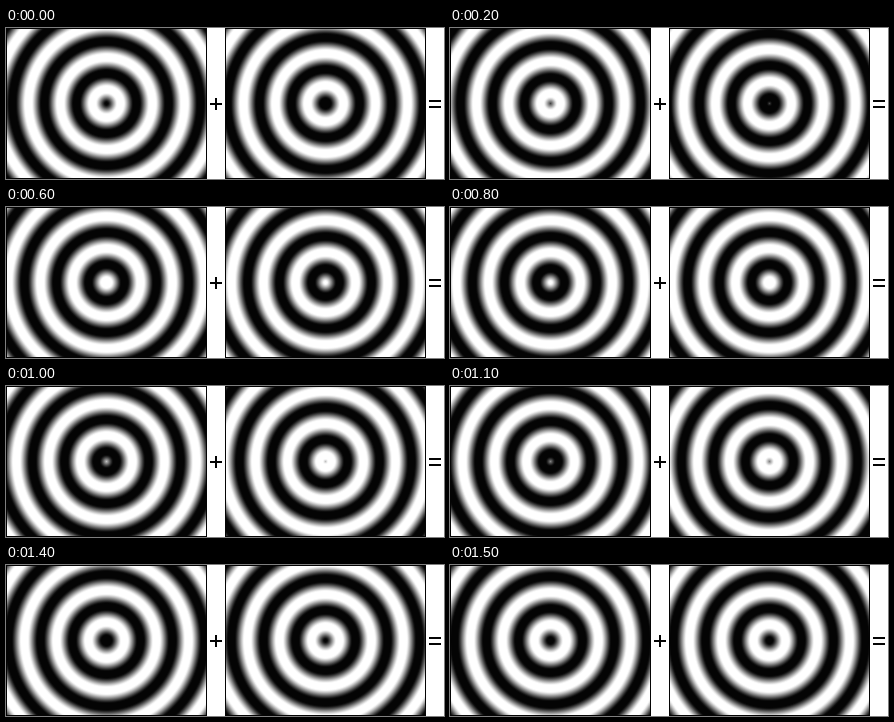
An HTML page that plays this animation: 438 px wide and 151 px high, repeating every 1.6 s.

```html
<!DOCTYPE html>
<html lang="en">
<head>
<meta charset="utf-8">
<title>Converging and diverging waves</title>
<style>
html, body { margin: 0; width: 100%; height: 100%; overflow: hidden; background: #fff; }
svg { display: block; }
</style>
</head>
<body>
<svg width="438" height="151" viewBox="0 0 438 151" shape-rendering="crispEdges">
  <defs>
    <radialGradient id="inward" gradientUnits="userSpaceOnUse" spreadMethod="repeat" cx="100.5" cy="75.5" r="32"/>
    <radialGradient id="outward" gradientUnits="userSpaceOnUse" spreadMethod="repeat" cx="319.5" cy="75.5" r="32"/>
  </defs>
  <rect width="438" height="151" fill="#fff"/>
  <g stroke="#040404" stroke-width="1">
    <rect x="0.5" y="0.5" width="200" height="150" fill="url(#inward)"/>
    <rect x="219.5" y="0.5" width="200" height="150" fill="url(#outward)"/>
  </g>
  <path fill="#040404" d="M204 75h12v2h-12zM209 70h2v12h-2zM423 72h12v2h-12zM423 78h12v2h-12z"/>
</svg>
<script>
const STEPS = 16, STEP_MS = 100, STOPS = 32, CONTRAST = 1.3;
const BLACK = 4, WHITE = 255;

function makeWave(id, direction) {
  const gradient = document.getElementById(id);
  const stops = Array.from({ length: STOPS + 1 }, (_, i) => {
    const stop = document.createElementNS("http://www.w3.org/2000/svg", "stop");
    stop.setAttribute("offset", i / STOPS);
    return gradient.appendChild(stop);
  });
  return phase => stops.forEach((stop, i) => {
    const wave = Math.cos(2 * Math.PI * (i / STOPS + direction * phase));
    const level = Math.min(1, Math.max(0, 0.5 - 0.5 * CONTRAST * wave));
    const grey = Math.round(BLACK + (WHITE - BLACK) * level);
    stop.setAttribute("stop-color", `rgb(${grey},${grey},${grey})`);
  });
}

const waves = [makeWave("inward", 1), makeWave("outward", -1)];
let shown = -1;

function draw(ms) {
  const step = Math.floor(ms / STEP_MS) % STEPS;
  if (step === shown) return;
  shown = step;
  waves.forEach(setPhase => setPhase((step + 1) / STEPS));
}

const start = performance.now();
function tick() {
  draw(performance.now() - start);
  requestAnimationFrame(tick);
}
tick();
</script>
</body>
</html>
```
